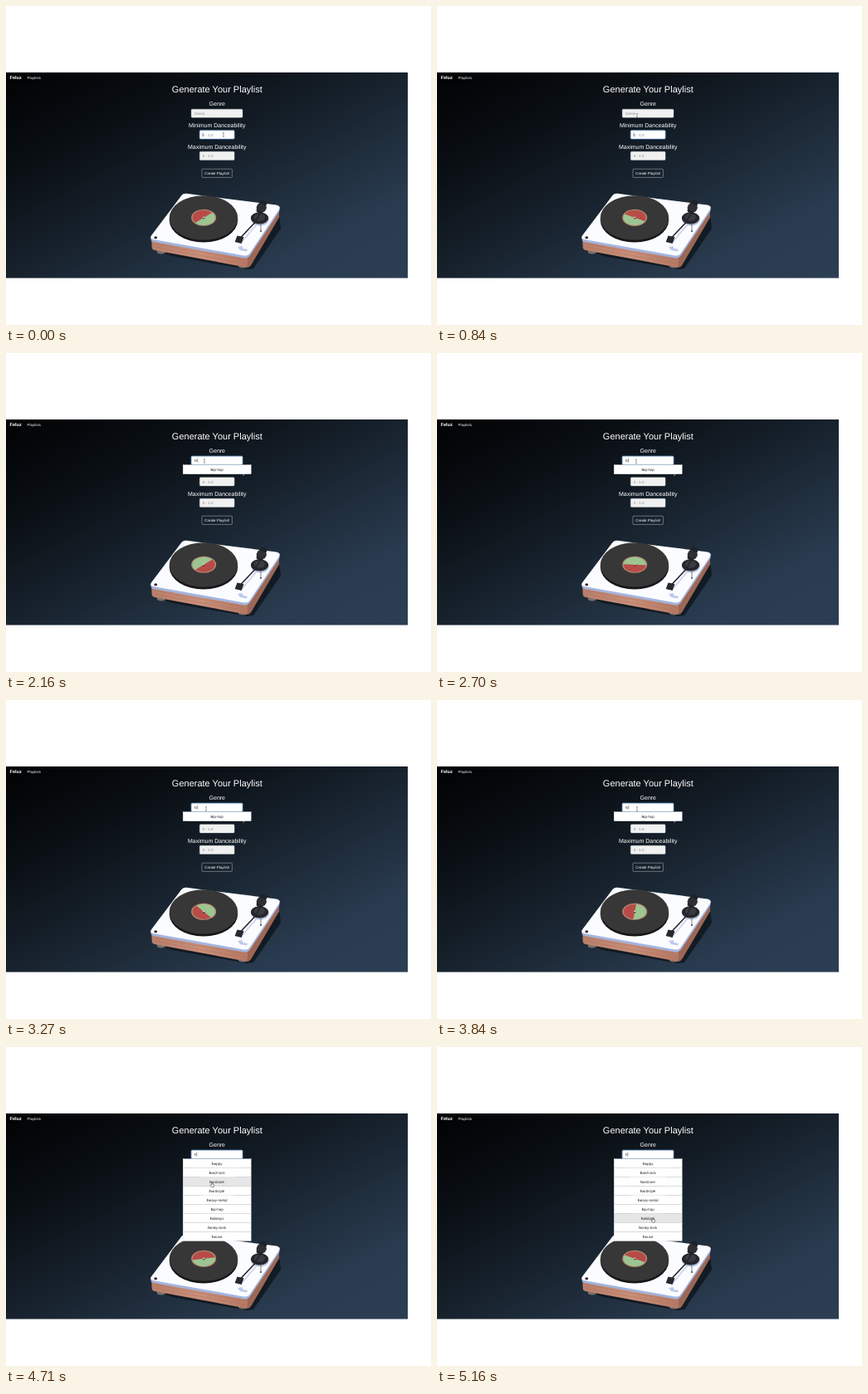
Animation, 512 px wide and 384 px high, one loop 5.19 s. Source, as an HTML page:

```html
<!DOCTYPE html>
<html lang="en">
<head>
<meta charset="utf-8">
<title>Generate Your Playlist</title>
<style>
  html, body { margin: 0; width: 100%; height: 100%; overflow: hidden; background: #fff; }
  svg { display: block; width: 512px; height: 384px; }
  text { font-family: "Liberation Sans", Arial, sans-serif; fill: #fff; text-rendering: geometricPrecision; }
  .mid { text-anchor: middle; }
  .label { font-size: 7px; text-anchor: middle; }
  .small { font-size: 4.45px; }
  .hint { fill: #858b91; }
  .typed, .item text { fill: #24282c; }
  .field { fill: #f0f1f0; stroke: #d5d9dc; stroke-width: .3; }
  .focus { fill: #fdfeff; stroke: #78abe6; stroke-width: .5; }
  .glow { fill: none; stroke: #3c7fce; stroke-width: .9; opacity: .3; }
  .caret { stroke: #333; stroke-width: .45; }
</style>
</head>
<body>
<svg viewBox="0 0 512 384" xmlns="http://www.w3.org/2000/svg">
  <defs>
    <linearGradient id="night" x1="0" y1="0" x2="1" y2="1">
      <stop offset="0" stop-color="#010203"/>
      <stop offset=".25" stop-color="#0a0f14"/>
      <stop offset=".5" stop-color="#17222d"/>
      <stop offset=".8" stop-color="#293b4f"/>
      <stop offset="1" stop-color="#2c3e52"/>
    </linearGradient>
    <linearGradient id="wood">
      <stop offset="0" stop-color="#b87e6a"/>
      <stop offset=".5" stop-color="#c98f79"/>
      <stop offset="1" stop-color="#b47762"/>
    </linearGradient>
    <clipPath id="listClip"><rect x="212.5" y="134" width="83.5" height="99.7"/></clipPath>
  </defs>

  <rect y="80" width="484" height="247.5" fill="url(#night)"/>
  <text x="4.5" y="88.4" font-size="5.6" font-weight="bold">Feluz</text>
  <text x="25.6" y="88" class="small">Playlists</text>
  <text x="254.3" y="104" class="mid" font-size="11">Generate Your Playlist</text>
  <text x="254.3" y="120.3" class="label">Genre</text>
  <text x="254.2" y="145.8" class="label">Minimum Danceability</text>
  <text x="254.2" y="171.5" class="label">Maximum Danceability</text>

  <g id="genre">
    <rect class="glow" x="222.8" y="123.8" width="62.6" height="10.9" rx="1.6"/>
    <rect class="field" x="223.2" y="124.2" width="61.8" height="10.1" rx="1.2"/>
    <text id="genreText" x="227" y="130.8" class="small"></text>
    <path id="genreCaret" class="caret" d="M0 126.6v5"/>
  </g>
  <g id="minimum">
    <rect class="glow" x="232.9" y="149.4" width="42.6" height="11" rx="1.6"/>
    <rect class="field" x="233.3" y="149.8" width="41.8" height="10.2" rx="1.2"/>
    <text x="236.8" y="156.5" class="small hint">0 - 1.0</text>
    <path id="minCaret" class="caret" d="M237 152.4v5"/>
  </g>
  <rect class="field" x="233.3" y="175.3" width="41.8" height="10.2" rx="1.2"/>
  <text x="236.8" y="182" class="small hint">0 - 1.0</text>
  <rect x="236" y="196.2" width="36.4" height="10.2" rx=".8" fill="none" stroke="#c9ced4" stroke-width=".45"/>
  <text x="254.2" y="202.8" class="small mid">Create Playlist!</text>

  <!-- turntable -->
  <path d="M187 296L200 301 290 317 298 316 331 268 329.5 255z" fill="#0b1016" opacity=".7"/>
  <g fill="#77706a">
    <path d="M182 293h10v4q-5 3-10 0z"/>
    <path d="M280 310h11v4q-5.5 3-11 0z"/>
  </g>
  <path d="M175.3 281.5L291.5 302.5 293.5 313.5Q292 315 288.5 314.4L179 294Q176 293.4 175.7 290.5z" fill="url(#wood)"/>
  <path d="M291.5 302.5L329 245 329 254.5 295.5 311.5Q293.5 314.6 290.5 314.4z" fill="#9d6755"/>
  <path d="M180 286l34 7 26 4 47 9M180 290l40 8 30 5 38 7" fill="none" stroke="#9d6450" stroke-width=".5" opacity=".6"/>
  <path d="M174.5 278V281Q174.9 283.4 178 284L287 303.4Q291.5 304 293.7 300.7L328.8 248Q330 246 329.8 242z" fill="#a3b5df"/>
  <path d="M211.5 228Q213.5 225.2 217.5 225.8L325.5 239.4Q331.8 240.6 328.5 245.5L293.5 298Q291.3 301.2 286.5 300.4L177.5 281Q172.5 280 175.3 276z" fill="#fbfcff"/>
  <ellipse cx="180.3" cy="278.8" rx="1.9" ry="1.5" fill="#3b2328"/>
  <ellipse cx="238" cy="257.7" rx="41.2" ry="26.8" fill="#171717"/>
  <ellipse cx="238" cy="255" rx="41.2" ry="26.8" fill="#383737"/>
  <g transform="translate(238.2 254.8) scale(1 .67)">
    <g id="disc">
      <circle r="15" fill="#b58a72"/>
      <circle r="13.6" fill="#9dc592"/>
      <path d="M-13.6 0A13.6 13.6 0 0 1 13.6 0z" fill="#b84b48"/>
    </g>
    <ellipse cy=".6" rx="1.2" ry="2" fill="#34302f"/>
    <ellipse cx="-.1" cy="-.6" rx=".9" ry="1.3" fill="#f5f4ef"/>
  </g>

  <!-- tonearm -->
  <path d="M284 284L302 263" stroke="#c3cfec" stroke-width="1.3"/>
  <path d="M279 290l5.5-1 1 3 5.5 1-1 2.5-8-1.5z" fill="#bccaeb"/>
  <ellipse cx="306" cy="257" rx="11" ry="7.4" fill="#b9c4dc"/>
  <ellipse cx="305.5" cy="255.4" rx="10.6" ry="7.2" fill="#24262b"/>
  <ellipse cx="305.5" cy="254.2" rx="6.6" ry="4.5" fill="#383b41"/>
  <path d="M308 246L299.5 261 281.5 280" fill="none" stroke="#22252a" stroke-width="1.6" stroke-linejoin="round"/>
  <path d="M278.5 276.5l8 1.6-2.8 7.8-8-1.8z" fill="#26282d"/>
  <g transform="rotate(25 308 242)">
    <rect x="303.6" y="233.6" width="8.6" height="16.4" rx="3.4" fill="#202226"/>
    <rect x="302.3" y="238.4" width="11.6" height="8.6" rx="3.2" fill="#2d2f34"/>
  </g>
  <path d="M307 261v10" stroke="#4b505a" stroke-width=".7"/>
  <circle cx="307" cy="271" r=".9" fill="#32363d"/>

  <g id="list" clip-path="url(#listClip)"></g>

  <path id="beam" d="M-1-2.4Q0-2.4 0-1.8V1.8Q0 2.4-1 2.4M1-2.4Q0-2.4 0-1.8M0 1.8Q0 2.4 1 2.4" fill="none" stroke="#333" stroke-width=".45"/>
  <path id="hand" d="M-.6-2.3Q0-3 .5-2.3V-.4L2 0Q2.7.2 2.5 1.1L2 3.2H-.4L-2 .9Q-2-.1-.6.7z" fill="#fff" stroke="#222" stroke-width=".5"/>
</svg>
<script>
const LOOP = 5190, STEP = 30;
const FOCUS = 1410, TYPE_H = 1860, TYPE_HI = 2010, ERASE_I = 4050;
const ROW = 11, LIST_TOP = 134.7;
const GENRES = ["happy", "hard-rock", "hardcore", "hardstyle", "heavy-metal",
  "hip-hop", "holidays", "honky-tonk", "house"];

// time, x, y
const POINTER = [
  [0, 262, 155], [180, 262, 155], [720, 241, 132], [1350, 241, 131],
  [1710, 239.5, 129.3], [2160, 239, 130], [3270, 241, 131], [4020, 241, 131],
  [4230, 241.5, 141], [4440, 241.5, 141], [5100, 260, 208], [LOOP, 260, 208]
];

const $ = id => document.getElementById(id);
const show = (el, on) => el.setAttribute("visibility", on ? "inherit" : "hidden");
const ease = p => p * p * (3 - 2 * p);

function pointerAt(t) {
  const i = POINTER.findIndex(p => p[0] > t);
  const [t0, x0, y0] = POINTER[i - 1], [t1, x1, y1] = POINTER[i];
  const p = ease((t - t0) / (t1 - t0));
  return [x0 + (x1 - x0) * p, y0 + (y1 - y0) * p];
}

function typedAt(t) {
  if (t < TYPE_H) return "";
  return t >= TYPE_HI && t < ERASE_I ? "hi" : "h";
}

function setFocus(id, on) {
  const [glow, box] = $(id).querySelectorAll("rect");
  show(glow, on);
  box.setAttribute("class", on ? "focus" : "field");
}

function rowMarkup(name, i, typed, hovered) {
  const y = LIST_TOP + i * ROW;
  return `<g class="item"><rect x="213.2" y="${y}" width="82" height="${ROW}"
    fill="${hovered ? "#e6e6e6" : "#fff"}" stroke="#d9dbde" stroke-width=".4"/>
    <text class="small mid" x="254.2" y="${y + 6.8}"><tspan font-weight="bold">${typed}</tspan>${name.slice(typed.length)}</text></g>`;
}

let listKey = "";
function drawList(typed, hover) {
  const key = typed + hover;
  if (key === listKey) return;
  listKey = key;
  $("list").innerHTML = typed ? GENRES.filter(g => g.startsWith(typed))
    .map((g, i) => rowMarkup(g, i, typed, i === hover)).join("") : "";
}

function draw(t) {
  const typed = typedAt(t);
  const [x, y] = pointerAt(t);
  const focused = t >= FOCUS;

  $("disc").setAttribute("transform", `rotate(${-42 + t / 12})`);
  setFocus("genre", focused);
  setFocus("minimum", !focused);
  show($("minCaret"), !focused);
  show($("genreCaret"), typed);

  const text = $("genreText");
  text.textContent = typed || "Genre";
  text.setAttribute("class", "small " + (typed ? "typed" : "hint"));
  $("genreCaret").setAttribute("transform", `translate(${227.3 + text.getComputedTextLength()})`);

  const onList = t > ERASE_I && y > LIST_TOP;
  const row = Math.floor((y - LIST_TOP) / ROW);
  drawList(typed, onList && row > 0 ? row : -1);

  show($("beam"), !onList);
  show($("hand"), onList);
  for (const id of ["beam", "hand"]) $(id).setAttribute("transform", `translate(${x} ${y})`);
}

const start = performance.now();
function tick() {
  const t = (performance.now() - start) % LOOP;
  draw(Math.floor(t / STEP) * STEP);
  requestAnimationFrame(tick);
}
tick();
</script>
</body>
</html>
```
